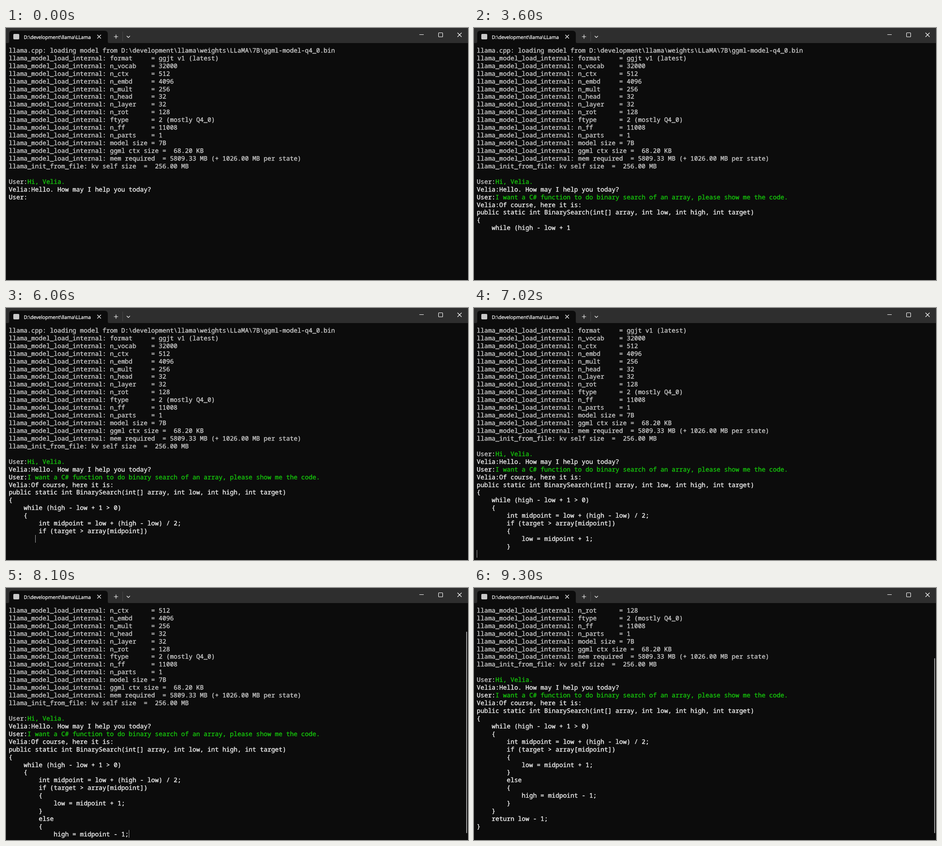
Recreate the animation shown at these times as an HTML page. Size 1012 px wide and 553 px high, loop 9.36 s.

```html
<!DOCTYPE html>
<html lang="en">
<head>
<meta charset="utf-8">
<title>Terminal session</title>
<style>
  html, body { margin: 0; width: 100%; height: 100%; overflow: hidden; background: #0c0c0c; }
  svg { display: block; width: 1012px; height: 553px; }
  text { white-space: pre; text-rendering: geometricPrecision; stroke-linejoin: round; }
  #rows { font: 500 13.7px "Noto Sans Mono", "DejaVu Sans Mono", monospace; font-variant-ligatures: none; stroke-width: 0.4; }
  .log { fill: #ccc; stroke: #ccc; }
  .chat { fill: #f2f2f2; stroke: #f2f2f2; }
  .typed { fill: #16c60c; stroke: #16c60c; }
  .title { font: 500 10.6px "Open Sans", "Noto Sans", sans-serif; fill: #fff; stroke: #fff; stroke-width: 0.3; }
  .icons { fill: none; stroke: #fff; stroke-width: 1.1; }
</style>
</head>
<body>
<svg viewBox="0 0 1012 553">
  <rect width="1012" height="553" fill="#0c0c0c"/>
  <rect width="1012" height="33" fill="#2e2e2e"/>
  <path d="M3 33.5q4 0 4-4V13q0-7 7-7H216q7 0 7 7V29.5q0 4 4 4z" fill="#0c0c0c"/>
  <rect x="16" y="13" width="13" height="12" rx="2" fill="#c8c8c8"/>
  <clipPath id="tab"><rect x="38" y="8" width="148" height="24"/></clipPath>
  <text class="title" x="39" y="24" clip-path="url(#tab)">D:\development\llama\LLama</text>
  <path d="M255.5 8V29" stroke="#484848"/>
  <g class="icons">
    <path d="M200 15l8 8m0-8l-8 8M236.5 19h9M241 14.5v9M264.5 17.5l3.5 3.5 3.5-3.5"/>
    <path d="M905.5 14.5h9.5M989 10.5l9 9m0-9l-9 9"/>
    <rect x="947.5" y="10.5" width="9" height="9" rx="1"/>
  </g>
  <g id="rows"></g>
  <rect id="cursor" width="1" height="17" fill="#a8a8a8"/>
  <rect id="thumb" x="1008" width="2" rx="1" fill="#9f9f9f"/>
</svg>
<script>
const LOOP = 9360, STEP = 60;
const ROWS = 30, LEFT = 6, TOP = 40.5, LINE = 16.93, ADVANCE = 8.22;
const LAST_LOG_LINE = 17;
const TRACK_TOP = 51.5, TRACK_END = 538;

const settings = [
  ["format", "ggjt v1 (latest)"], ["n_vocab", 32000], ["n_ctx", 512], ["n_embd", 4096],
  ["n_mult", 256], ["n_head", 32], ["n_layer", 32], ["n_rot", 128],
  ["ftype", "2 (mostly Q4_0)"], ["n_ff", 11008], ["n_parts", 1], ["model size", "7B"],
  ["ggml ctx size", " 68.20 KB"], ["mem required ", "5809.33 MB (+ 1026.00 MB per state)"],
];
const intro = [
  "llama.cpp: loading model from D:\\development\\llama\\weights\\LLaMA\\7B\\ggml-model-q4_0.bin",
  ...settings.map(([key, value]) => `llama_model_load_internal: ${key.padEnd(10)} = ${value}`),
  "llama_init_from_file: kv self size  =  256.00 MB",
  "",
  "User:Hi, Velia.",
  "Velia:Hello. How may I help you today?",
  "User:",
].join("\n");

// Bursts of output: start time, time per token, tokens.
const bursts = [
  [300, 60, "I want a C# function to do binary search of an array, please show me the code.|\n"],
  [1020, 60, "Velia|:|Of| course|,| here| it| is|:|\n|public| static| int| Binary|Search|("],
  [1980, 75, "int|[]| array|,| int| low|,| int| high|,| int| target"],
  [2940, 55, ")|\n|{|\n|   | while| (|high| -| low| +| |1"],
  [3660, 63, " >| |0|)|\n|   | {|\n|       | int| mid|point| =| low| +| (|high| -"],
  [4860, 60, " low|)| /| |2|;|\n|       | if| (|target| >| array|[|mid|point"],
  [5820, 80, "]|)|\n|       "],
  [6120, 60, " {|\n|           | low| =| mid|point| +| |1|;"],
  [6780, 80, "\n|       | }|\n|       | else|\n"],
  [7440, 60, "       | {|\n|           | high| =| mid|point| -| |1|;|\n|       | }|\n"],
  [8460, 60, "   | }|\n|   | return| low| -| |1|;|\n|}|\n"],
];
const events = bursts.flatMap(([start, gap, tokens]) =>
  tokens.split("|").map((token, i) => [start + i * gap, token]));

const blinkStarts = [240, 1920, 2760, 3780, 4620, 5700, 6780, 7920];
const BLINK_ON = 540;

const linesAt = time =>
  (intro + events.filter(([at]) => at <= time).map(([, token]) => token).join("")).split("\n");
const scrollOf = lines => Math.max(0, lines.length - ROWS);

const svgNode = (name, parent) =>
  parent.appendChild(document.createElementNS("http://www.w3.org/2000/svg", name));
const byId = id => document.getElementById(id);
const cursor = byId("cursor"), thumb = byId("thumb");

const rows = Array.from({ length: ROWS }, (_, i) => {
  const node = svgNode("text", byId("rows"));
  node.setAttribute("x", LEFT);
  node.setAttribute("y", TOP + 13.4 + i * LINE);
  const plain = svgNode("tspan", node), typed = svgNode("tspan", node);
  typed.setAttribute("class", "typed");
  return { plain, typed };
});

function draw(time) {
  const lines = linesAt(time), scroll = scrollOf(lines);
  rows.forEach(({ plain, typed }, i) => {
    const index = i + scroll, line = lines[index] || "";
    const split = line.startsWith("User:") ? 5 : line.length;
    plain.setAttribute("class", index <= LAST_LOG_LINE ? "log" : "chat");
    plain.textContent = line.slice(0, split);
    typed.textContent = line.slice(split);
  });

  const last = lines.length - 1;
  const lit = blinkStarts.some(start => time >= start && time < start + BLINK_ON);
  cursor.setAttribute("x", Math.round(LEFT + 0.3 + lines[last].length * ADVANCE));
  cursor.setAttribute("y", Math.round(TOP + (last - scroll) * LINE));
  cursor.setAttribute("visibility", lit ? "visible" : "hidden");

  // The scroll bar follows the text one step late.
  const late = scrollOf(linesAt(time - STEP));
  const top = TRACK_TOP + (TRACK_END - TRACK_TOP) * late / (ROWS + late);
  thumb.setAttribute("y", top);
  thumb.setAttribute("height", TRACK_END - top);
  thumb.setAttribute("visibility", late ? "visible" : "hidden");
}

let shown = -1;
function tick() {
  const time = Math.floor(performance.now() % LOOP / STEP) * STEP;
  if (time !== shown) draw(shown = time);
  requestAnimationFrame(tick);
}
tick();
</script>
</body>
</html>
```
